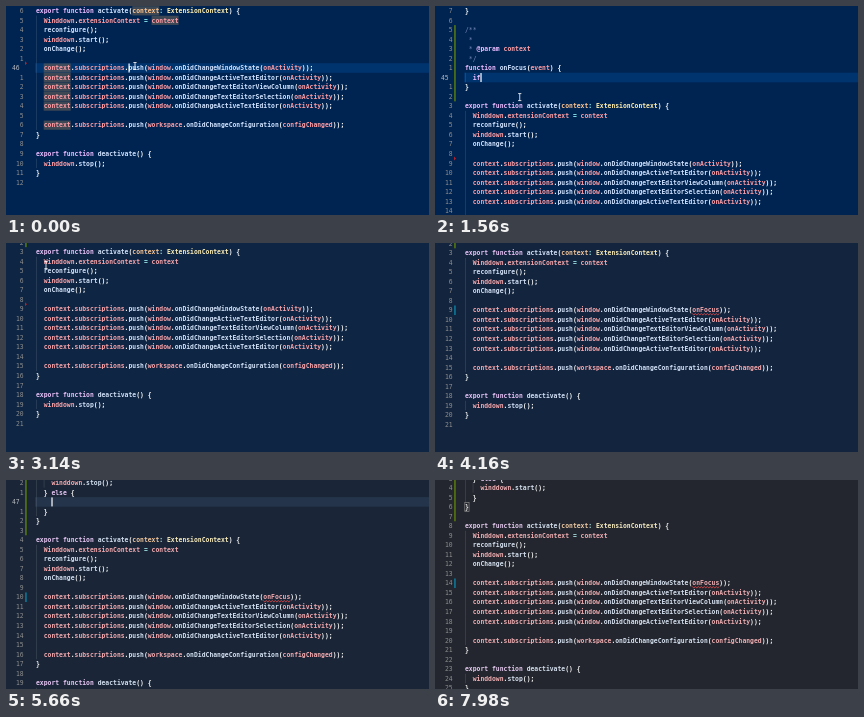
Animation, 423 px wide and 209 px high, one loop 8000 ms. Source, as an HTML page with a canvas:

```html
<!DOCTYPE html>
<html lang="en">
<head>
<meta charset="utf-8">
<title>Editor winding down</title>
<style>
  html, body { margin: 0; width: 100%; height: 100%; overflow: hidden; background: #002451; }
  canvas { display: block; width: 423px; height: 209px; }
</style>
</head>
<body>
<canvas id="stage"></canvas>
<script>
const LOOP = 8000, W = 423, H = 209;
const ROW = 9.53, CHAR = 3.853, LEFT = 30;
const canvas = document.getElementById('stage');
const ctx = canvas.getContext('2d');
const dpr = window.devicePixelRatio || 1;
canvas.width = W * dpr;
canvas.height = H * dpr;

// Each colour fades from its vivid to its wound-down value
const COLORS = {
  back: ['#002451', '#23262e'], line: ['#00346e', '#30343f'], widget: ['#001c40', '#1b1e24'],
  fg: ['#ffffff', '#f4f4f4'], keyword: ['#ebbbff', '#e3c8ee'], call: ['#cfe2ff', '#d4dfee'],
  type: ['#ffeead', '#f4e9bf'], name: ['#ff9da4', '#eeadb1'], param: ['#ffc58f', '#eec8a3'],
  op: ['#99ffff', '#aeeaea'], comment: ['#7285b7', '#7f8aa8']
};
const FADE = [[0, 0], [2300, 0], [3140, 0.4], [4770, 0.65], [5660, 0.75], [8000, 1]];

// Interpolation through [time, value] stops
const smooth = u => u * u * (3 - 2 * u);
function track(stops, t, ease = smooth) {
  const i = stops.findIndex(s => s[0] > t);
  if (i === 0) return stops[0][1];
  if (i < 0) return stops[stops.length - 1][1];
  const [t0, a] = stops[i - 1], [t1, b] = stops[i];
  return a + (b - a) * ease((t - t0) / (t1 - t0));
}
function mix([from, to], p) {
  const channels = [1, 3, 5].map(i => {
    const [a, b] = [from, to].map(hex => parseInt(hex.slice(i, i + 2), 16));
    return Math.round(a + (b - a) * p);
  });
  return `rgb(${channels.join()})`;
}
function paletteAt(t) {
  const p = track(FADE, t, u => u), out = {};
  for (const key in COLORS) out[key] = mix(COLORS[key], p);
  return out;
}
const typed = (text, from, to, t) =>
  text.slice(0, Math.max(0, Math.min(text.length, Math.floor((t - from) / (to - from) * text.length + 1e-6))));
const stepped = (from, to, count, t) =>
  Math.max(0, Math.min(count, Math.floor((t - from) / (to - from) * count)));

// Document
const FIRST = 33;
const HEAD = ['', 'function configChanged() {', '  winddown.stop();', '  reconfigure();', '  winddown.start();', '}', ''];
const push = (event, arg) => `  context.subscriptions.push(${event}(${arg}));`;
const tail = handler => [
  'export function activate(context: ExtensionContext) {',
  '  Winddown.extensionContext = context', '  reconfigure();', '  winddown.start();', '  onChange();', '',
  push('window.onDidChangeWindowState', handler),
  ...['ActiveTextEditor', 'TextEditorViewColumn', 'TextEditorSelection', 'ActiveTextEditor']
    .map(e => push('window.onDidChange' + e, 'onActivity')),
  '', push('workspace.onDidChangeConfiguration', 'configChanged'), '}', '',
  'export function deactivate() {', '  winddown.stop();', '}', ''
];

function comment(t) {
  if (t < 260) return [];
  if (t < 380) return [typed('/**', 260, 350, t)];
  const doc = ['/**', ' *', ' * ' + typed('@param context', 420, 600, t), ' */'];
  if (t > 1640) doc.splice(1, 1);
  return doc;
}

function body(t) {
  if (t < 640) return [];
  const head = typed('function ', 640, 800, t) + typed('onFocus(event) {', 860, 1380, t);
  if (t < 1420) return [head];
  if (t < 4860) {
    const line = t < 2500 ? typed('if (event.', 1460, 1800, t) : t < 4560 ? '' : 'i';
    return [head, '  ' + line, '}'];
  }
  const test = '  i' + typed('f (event.focused) {', 4860, 5100, t);
  if (t < 5130) return [head, test, '}'];
  const stop = '    ' + typed('winddown.stop();', 5140, 5340, t);
  if (t < 5370) return [head, test, stop, '  }', '}'];
  const other = '  }' + typed(' else {', 5370, 5540, t);
  if (t < 5570) return [head, test, stop, other, '}'];
  return [head, test, stop, other, '    ' + typed('winddown.start();', 5720, 6460, t), '  }', '}'];
}

function sceneAt(t) {
  const doc = comment(t), fn = body(t);
  const handler = t < 3420 ? 'onActivity' : typed('onFocus', 3440, 3740, t);
  const added = doc.length + fn.length;
  const lines = [...HEAD, ...doc, ...fn, ...(added ? [''] : []), ...tail(handler)];
  const fnAt = HEAD.length + doc.length;
  const exportAt = fnAt + fn.length + (added ? 1 : 0);
  const stateAt = exportAt + 6;

  let cur;
  if (t < 260) cur = stateAt - stepped(60, 230, 7, t);
  else if (t < 380) cur = fnAt - 1;
  else if (t < 640) cur = fnAt - 2;
  else if (t < 1420) cur = fnAt;
  else if (t > 3320 && t < 3900) cur = stateAt;
  else if (t < 5130) cur = fnAt + 1;
  else if (t < 5370) cur = fnAt + 2;
  else if (t < 5570) cur = fnAt + 3;
  else cur = fnAt + 4 - stepped(7300, 7600, 4, t);

  let col = lines[cur].length;
  if (t < 260) col = Math.min(24, col);
  else if (cur === stateAt) col -= '));'.length;

  const anchor = t < 640 ? cur : fnAt;
  const anchorY = track([
    [0, 62], [1600, 62], [2080, -22.4], [2560, -22.4], [3040, -29.2],
    [4090, -29.2], [4480, -16.2], [7560, -16.2], [7860, -30.2]
  ], t);
  const top = anchorY - anchor * ROW;
  return { lines, added, exportAt, stateAt, cur, col, changed: t >= 3420, y: i => top + i * ROW };
}

// Drawing
function text(str, x, y, color, weight = 'bold') {
  ctx.save();
  ctx.translate(x, y);
  ctx.scale(0.1, 0.1);
  ctx.font = `${weight} 64px "DejaVu Sans Mono", monospace`;
  ctx.fillStyle = color;
  ctx.fillText(str, 0, 0);
  ctx.restore();
}
function rect(x, y, w, h, color) {
  ctx.fillStyle = color;
  ctx.fillRect(x, y, w, h);
}
function path(points, color, close) {
  ctx.beginPath();
  points.forEach(([x, y]) => ctx.lineTo(x, y));
  if (close) ctx.closePath();
  ctx.strokeStyle = color;
  ctx.lineWidth = 0.8;
  ctx.stroke();
}

const KEYWORD = /^(export|function|if|else)$/;
function codeLine(line, y, pal) {
  if (/^ ?(\/\*|\*)/.test(line)) {
    line.split(/(@param|context)/).reduce((x, part) => {
      const key = part === '@param' ? 'keyword' : part === 'context' ? 'name' : 'comment';
      text(part, x, y, pal[key], key === 'comment' ? 'normal' : 'bold');
      return x + part.length * CHAR;
    }, LEFT);
    return;
  }
  for (const m of line.matchAll(/\w+|[^\w\s]/g)) {
    const word = m[0], next = line[m.index + word.length];
    let key = 'name';
    if (KEYWORD.test(word)) key = 'keyword';
    else if (/[=:]/.test(word)) key = 'op';
    else if (/\W/.test(word)) key = 'fg';
    else if (word === 'ExtensionContext') key = 'type';
    else if (next === ':') key = 'param';
    else if (next === '(') key = 'call';
    text(word, LEFT + m.index * CHAR, y, pal[key]);
  }
}

function icon(kind, x, y) {
  if (kind === 'k') {
    [[-3, 2.5], [-0.5, 3], [-3, 1.5]].forEach(([from, to], i) =>
      path([[x + from, y - 2 + i * 2], [x + to, y - 2 + i * 2]], '#c5c5c5'));
    rect(x - 3, y - 0.5, 1.6, 1, '#c5c5c5');
  } else if (kind === 'v') {
    for (const s of [-1, 1])
      path([[x + s * 2, y - 2.3], [x + s * 3.2, y - 2.3], [x + s * 3.2, y + 2.3], [x + s * 2, y + 2.3]], '#75beff');
    path([[x - 1.5, y], [x, y - 1.3], [x + 1.5, y], [x, y + 1.3]], '#75beff', true);
  } else {
    const color = kind === 'm' ? '#b180d7' : '#75beff';
    path([[x, y - 3], [x + 2.8, y - 1.5], [x + 2.8, y + 1.5], [x, y + 3], [x - 2.8, y + 1.5], [x - 2.8, y - 1.5]], color, true);
    path([[x - 2.8, y - 1.5], [x, y], [x + 2.8, y - 1.5]], color);
    path([[x, y], [x, y + 3]], color);
  }
}

// Icon letter: keyword, variable, method or field
const POPUPS = [
  { from: 1820, to: 2500, x: 75, detail: '(property) Event.AT_TARGET: number',
    items: 'f:AT_TARGET f:BUBBLING_PHASE f:CAPTURING_PHASE f:NONE f:bubbles f:cancelBubble f:cancelable f:composed m:composedPath f:currentTarget f:defaultPrevented f:detail' },
  { from: 4600, to: 4870, x: 40, match: 1,
    items: 'k:if k:implements k:import m:importScripts k:in v:indexedDB v:innerHeight v:innerWidth k:instanceof k:interface m:isFinite m:isNaN' },
  { from: 6130, to: 6380, x: 80, items: 'm:start m:stop' }
];

function popup({ x, items, detail, match = 0 }, y, pal) {
  const rows = items.split(' '), w = 165, h = rows.length * ROW;
  if (detail) {
    rect(x + w, y, 166, 31, pal.widget);
    ctx.strokeStyle = '#3c3f5c';
    ctx.lineWidth = 0.7;
    ctx.strokeRect(x + w, y, 166, 31);
    text(detail, x + w + 4, y + 10.2, pal.fg, 'normal');
  }
  rect(x, y, w, h, pal.widget);
  rect(x, y, w, ROW, 'rgba(255,255,255,.376)');
  rows.forEach((row, i) => {
    const [kind, label] = row.split(':'), mid = y + (i + 0.5) * ROW;
    icon(kind, x + 6.4, mid + 0.3);
    text(label, x + 12.4, mid + 2.5, pal.fg);
    if (match) text(label.slice(0, match), x + 12.4, mid + 2.5, pal.call);
  });
  if (rows.length > 10) rect(x + w - 4.5, y, 4, 53, 'rgba(121,121,121,.4)');
  ctx.strokeStyle = '#454555';
  ctx.lineWidth = 0.8;
  ctx.strokeRect(x, y, w, h);
}

function gutter(s) {
  const bar = (i, n, color) => rect(19.2, s.y(i) - ROW / 2, 1.5, n * ROW, color);
  if (s.added) bar(HEAD.length, s.added + 1, '#587c0c');
  if (s.changed) bar(s.stateAt, 1, '#0c7d9d');
  else {
    const y = s.y(s.stateAt) - ROW / 2;
    ctx.fillStyle = '#b0202a';
    ctx.beginPath();
    ctx.moveTo(19, y - 2);
    ctx.lineTo(21, y);
    ctx.lineTo(19, y + 2);
    ctx.fill();
  }
}

// Indent guides continue through blank lines inside a block
function guides(s) {
  let depth = 0;
  s.lines.forEach((line, i) => {
    if (line.trim()) depth = line.startsWith(' *') ? 0 : Math.floor(line.search(/\S/) / 2);
    else if (/^\}?$/.test(s.lines[i - 1] || '')) depth = 0;
    for (let d = 0; d < depth; d++)
      rect(LEFT + d * 2 * CHAR, s.y(i) - ROW / 2, 0.7, ROW, 'rgba(255,255,255,.15)');
  });
}

function squiggle(s) {
  const y = s.y(s.stateAt) + 4, from = LEFT + s.lines[s.stateAt].indexOf('onFocus') * CHAR;
  const points = [];
  for (let i = 0; i <= 18; i++) points.push([from + i * 1.5, y + (i % 2 ? 0.6 : -0.6)]);
  path(points, '#f14c4c');
}

function mouse(t) {
  if (t > 3600) return;
  const x = track([[0, 129], [100, 129], [700, 59], [1000, 59], [2100, 109], [2400, 109], [3080, 40], [3260, 40], [3600, 30]], t);
  const y = track([[0, 60], [100, 60], [700, 71], [1000, 71], [2100, 110], [2400, 110], [3080, 22], [3260, 22], [3600, -12]], t);
  path([[x, y - 3.5], [x, y + 3.5]], '#fff');
  for (const s of [-3.5, 3.5]) path([[x - 1.6, y + s], [x + 1.6, y + s]], '#fff');
}

function draw(t) {
  const pal = paletteAt(t), s = sceneAt(t);
  ctx.setTransform(dpr, 0, 0, dpr, 0, 0);
  rect(0, 0, W, H, pal.back);
  rect(29, s.y(s.cur) - ROW / 2, W - 29, ROW, pal.line);
  gutter(s);
  guides(s);

  s.lines.forEach((line, i) => {
    const y = s.y(i);
    if (y < -8 || y > H + 8) return;
    if (t < 85 && i >= s.exportAt)
      for (const m of line.matchAll(/\bcontext\b/g))
        rect(LEFT + m.index * CHAR, y - 4.6, 7 * CHAR, 9.2, 'rgba(87,87,87,.72)');
    const current = i === s.cur;
    const label = String(current ? FIRST + i : Math.abs(i - s.cur));
    text(label, current ? 6 : 17.6 - label.length * CHAR, y + 2.2, current ? '#b4b8bf' : '#8c8c8c', 'normal');
    codeLine(line, y + 2.2, pal);
  });

  const closing = s.exportAt - 2;
  if (t > 4480 && t < 4860 || t > 7600) {
    ctx.strokeStyle = '#888888';
    ctx.lineWidth = 0.7;
    ctx.strokeRect(LEFT - 0.2, s.y(closing) - 4.4, CHAR + 0.4, 8.8);
  }
  if (t >= 3740) squiggle(s);
  rect(LEFT + s.col * CHAR, s.y(s.cur) - 4.5, 1.2, 9, '#fff');
  for (const p of POPUPS)
    if (t >= p.from && t < p.to) popup(p, s.y(s.cur) + ROW / 2, pal);
  mouse(t);
}

const start = performance.now();
function frame() {
  draw((performance.now() - start) % LOOP);
  requestAnimationFrame(frame);
}
frame();
</script>
</body>
</html>
```
